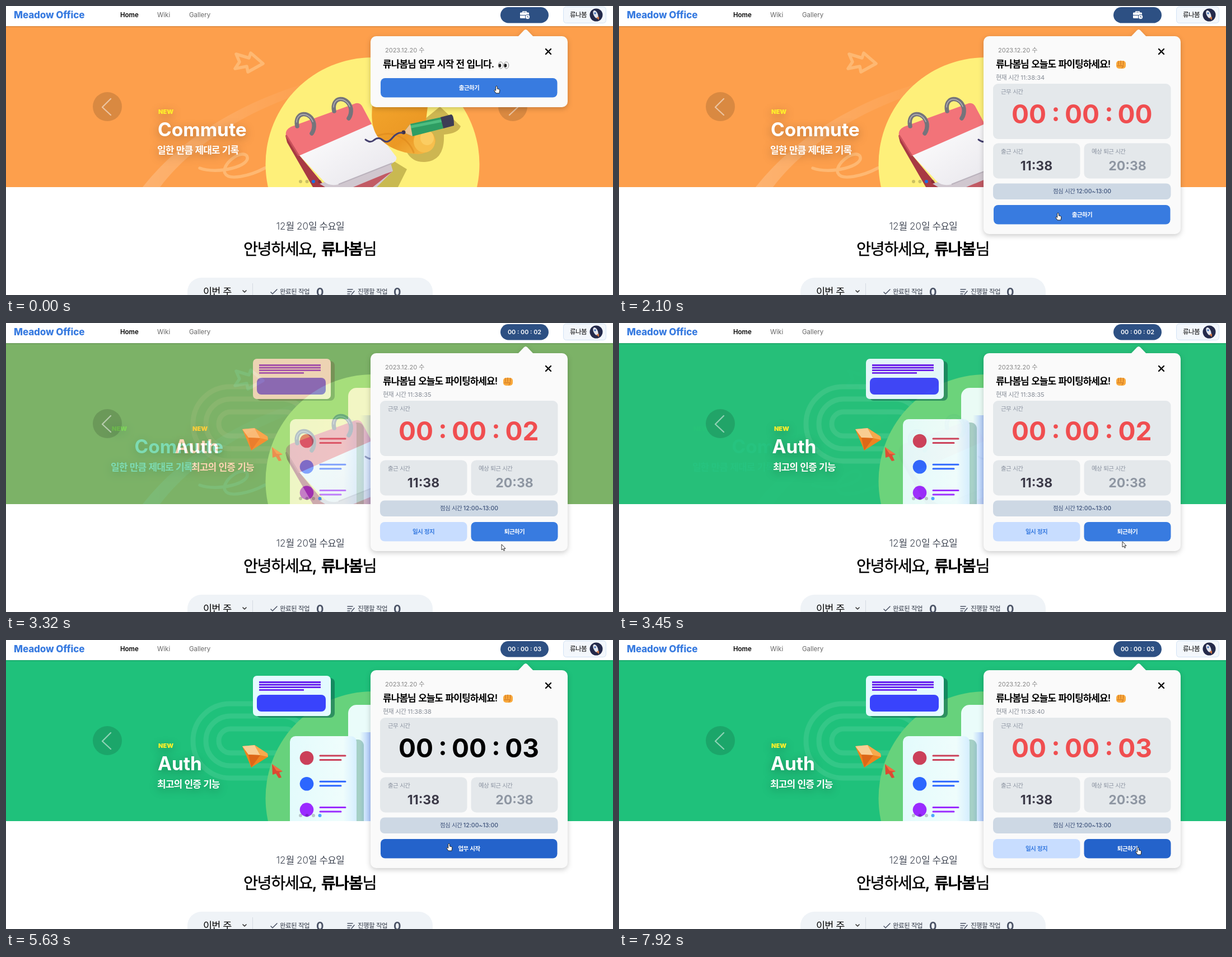
An HTML page for the animation above (8000 ms loop, 1084 by 517 pixels).

```html
<!DOCTYPE html>
<html lang="ko">
<head>
<meta charset="utf-8">
<style>
html, body { margin: 0; width: 100%; height: 100%; overflow: hidden; background: #fff; }
svg { display: block; width: 1084px; height: 517px; }
text { font-family: Inter, "Noto Sans CJK KR", "Noto Sans CJK", sans-serif; white-space: pre; }
.ko { letter-spacing: -.055em; }
.mid { text-anchor: middle; }
.bold { font-weight: 700; }
.semi { font-weight: 600; }
.label { font-size: 10.5px; fill: #8b93a0; }
.button { font-size: 10.5px; font-weight: 600; fill: #fff; text-anchor: middle; }
.caption text { fill: #fff; font-weight: 600; font-size: 17px; filter: drop-shadow(0 4px 8px rgba(0,0,0,.3)); }
.caption .new { fill: #fff02a; font-weight: 900; font-size: 11px; }
.caption .title { font-size: 33.4px; font-weight: 700; }
.clock { font-size: 46px; font-weight: 700; text-anchor: middle; }
.dialog text { font-family: "Open Sans", "Noto Sans CJK KR", "Noto Sans CJK", sans-serif; fill: #25272b; font-size: 10px; }
.dialog .ko { letter-spacing: -.02em; }
.shadow { filter: drop-shadow(0 3px 5px rgba(0,0,0,.2)); }
.line { fill: none; stroke-linecap: round; stroke-linejoin: round; }
</style>
</head>
<body>
<svg viewBox="0 0 1084 517">
  <defs>
    <clipPath id="banner"><rect y="36" width="1084" height="288"/></clipPath>
    <linearGradient id="fade"><stop stop-color="#fff" stop-opacity=".2"/><stop offset="1" stop-color="#fff" stop-opacity="0"/></linearGradient>
    <linearGradient id="glass"><stop stop-color="#e3fbfc"/><stop offset=".8" stop-color="#effdfc"/><stop offset="1" stop-color="#d5eeff"/></linearGradient>
    <linearGradient id="glow"><stop stop-color="#86a8ff" stop-opacity="0"/><stop offset="1" stop-color="#86a8ff"/></linearGradient>
    <linearGradient id="page" x2="1" y2="1"><stop stop-color="#fff"/><stop offset="1" stop-color="#e6e4ea"/></linearGradient>
    <linearGradient id="fur" x2="1" y2="1"><stop stop-color="#f3a52c"/><stop offset=".6" stop-color="#eb9824"/><stop offset="1" stop-color="#f8bd4a"/></linearGradient>
  </defs>

  <g clip-path="url(#banner)">
    <g>
      <rect y="36" width="1084" height="288" fill="#fd9f4c"/>
      <path d="M244 324C310 240 420 165 580 126L580 140C440 178 335 245 275 324Z" fill="url(#fade)"/>
      <g class="line" stroke="#ffd9a8" stroke-opacity=".42" stroke-width="5.5">
        <path d="M411 86L434 93L437 84L459 103L432 118L430 108L409 112L417 100Z"/>
        <path d="M346 290C378 302 440 286 430 268C419 256 384 284 391 299C397 313 436 304 462 290C492 284 510 262 492 264C470 268 460 308 486 309C500 309 508 302 520 299"/>
      </g>
      <circle cx="654.5" cy="283" r="191" fill="#fef07a"/>
      <path d="M600 324L690 276L716 292L700 324Z" fill="#c9b951"/>
      <path d="M499 232L523 266L571 324H548L502 244Z" fill="#a83a43"/>
      <path d="M560 318L686 278L691 295L662 324H570Z" fill="#d0c7cf"/>
      <path d="M620 324L678 300L690 296L655 324Z" fill="#c25a64"/>
      <path d="M523 266L652 211L697 270Q699 277 690 281L594 319Q578 323 568 314Z" fill="url(#page)"/>
      <path d="M594 319L690 281" stroke="#bbb3bd" stroke-width="2"/>
      <path d="M500 231Q498 222 509 216L622 175Q632 171 637 181L653 211L523 268Z" fill="#f27379"/>
      <path d="M500 231L523 268" stroke="#c9515b" stroke-width="3"/>
      <g class="line" stroke="#75747b" stroke-width="7.5">
        <path id="ring" d="M520 215C514 188 545 186 550 211Q551 221 546 228"/>
        <use href="#ring" x="66" y="-27"/>
      </g>
      <g class="line" stroke="#b5b4ba" stroke-width="1.5">
        <path id="shine" d="M519 208C519 190 541 189 548 207"/>
        <use href="#shine" x="66" y="-27"/>
      </g>
      <path d="M690 250L775 180L812 215Q808 228 782 230Q784 277 748 279Q726 280 716 262Z" fill="#cdb651"/>
      <path d="M655 172Q649 214 664 234Q690 263 736 265Q766 262 767 240Q764 222 748 221L754 172Z" fill="url(#fur)"/>
      <ellipse cx="747" cy="242" rx="19" ry="20" fill="#f7bf4d"/>
      <ellipse cx="752" cy="236" rx="12" ry="13" fill="#fbcd62"/>
      <path class="line" d="M664 232Q690 222 713 240Q724 250 728 262" stroke="#d98419" stroke-opacity=".5" stroke-width="3"/>
      <path d="M710 226L722 211L777 199L781 219L726 233Z" fill="#2e9d63"/>
      <path d="M719 217L779 205" stroke="#4dbd80" stroke-width="5"/>
      <path d="M710 226L722 211L726 233Z" fill="#edc18c"/>
      <path d="M776 199L795 194Q800 195 800 214L781 219Z" fill="#3d3c55"/>
      <circle cx="710" cy="226" r="3.5" fill="#3d3046"/>
      <path class="line" d="M642 239Q651 246 657 240Q665 233 673 240T690 236T708 227" stroke="#45406e" stroke-width="3"/>
      <g class="caption" id="oldText">
        <text class="new" x="272" y="192.5">NEW</text>
        <text class="title" x="271" y="232.5">Commute</text>
        <text x="270" y="264">일한 만큼 제대로 기록</text>
      </g>
    </g>
    <g id="newSlide">
      <rect y="36" width="1084" height="288" fill="#1fc17b"/>
      <g class="line" stroke="#fff" stroke-opacity=".09" stroke-width="9">
        <rect x="334" y="114" width="250" height="133" rx="66"/>
        <rect x="357" y="136" width="180" height="89" rx="44"/>
        <rect x="380" y="159" width="140" height="43" rx="21"/>
      </g>
      <circle cx="654.5" cy="283" r="191" fill="#67d27c"/>
      <rect x="447" y="68" width="140" height="71" rx="8" fill="#0e6d52" opacity=".65"/>
      <rect x="441" y="64" width="139" height="72" rx="7" fill="#e3faff"/>
      <path d="M452 75.5H562M452 80H562M452 84.7H562M452 89.3H532" stroke="#6418ee" stroke-width="2.8"/>
      <rect x="448" y="98" width="123" height="30" rx="8" fill="#3943fc"/>
      <rect x="611" y="116" width="180" height="240" rx="15" fill="#eafcfa"/>
      <rect x="632" y="165" width="22" height="159" fill="url(#glow)" opacity=".7"/>
      <rect x="516" y="178" width="123" height="170" rx="11" fill="#3c8d79" opacity=".4"/>
      <rect x="507" y="172" width="119" height="180" rx="10" fill="url(#glass)"/>
      <g id="rows"></g>
      <path d="M422 190L444 188L467 203L468 209L438 228Z" fill="#ee8420"/>
      <path d="M422 190L444 188L454 206L433 205Z" fill="#f9cf95"/>
      <path d="M444 188L467 203L468 209L454 206Z" fill="#f7aa4d"/>
      <path d="M433 205L454 206L438 228Z" fill="#dd6717"/>
      <path d="M475 222L494 235L488 237L492 246L487 247L482 239L476 241Z" fill="#dc4932"/>
      <path d="M475 222L494 235L483 234Z" fill="#f16f3f"/>
      <g class="caption" id="newText">
        <text class="new" x="272" y="192.5">NEW</text>
        <text class="title" x="271" y="232.5">Auth</text>
        <text x="270" y="264">최고의 인증 기능</text>
      </g>
    </g>
    <g fill="#000" fill-opacity=".14"><circle cx="181" cy="180" r="26"/><circle cx="905" cy="180" r="26"/></g>
    <path class="line" d="M187 166L172 181L187 195M899 166L914 181L899 195" stroke="#fff" stroke-opacity=".5" stroke-width="2.3"/>
    <g id="dots"></g>
  </g>

  <rect y="36" width="1084" height="2" fill="#000" opacity=".1"/>
  <rect width="1084" height="36" fill="#fff"/>
  <text x="14" y="22" font-size="17" font-weight="800" letter-spacing="-.1" fill="#387be0">Meadow Office</text>
  <text x="204" y="20" font-size="11.5" class="semi">Home</text>
  <g font-size="11.5" fill="#666"><text x="270" y="20">Wiki</text><text x="327" y="20">Gallery</text></g>
  <rect x="883" y="2" width="86" height="28.5" rx="14.2" fill="#2d5083"/>
  <g id="case">
    <path d="M923 12V10H929V12" fill="none" stroke="#fff" stroke-width="1.6"/>
    <rect x="918" y="11.5" width="16" height="10.5" rx="1.5" fill="#fff"/>
    <path d="M918 16.5H928" stroke="#2d5083"/>
    <circle cx="931.5" cy="19.5" r="4.2" fill="#fff" stroke="#2d5083"/>
    <path d="M931.5 17.5V20H933.5" fill="none" stroke="#2d5083" stroke-width=".9"/>
  </g>
  <text id="pill" class="mid semi" x="926" y="20" font-size="10.8" fill="#fff"></text>
  <rect x="995.5" y="1.5" width="76" height="29" rx="5" fill="#f3f7fc" stroke="#d3e3f5"/>
  <text x="1007" y="20" font-size="11.5">류나봄</text>
  <circle cx="1054" cy="16" r="11.5" fill="#242a4b"/>
  <ellipse cx="1053" cy="15" rx="3.8" ry="7.5" transform="rotate(-25 1053 15)" fill="#e3e6ef"/>
  <circle cx="1052" cy="13" r="1.8" fill="#4876bb"/>
  <path d="M1054 21L1059 19L1059 25Z" fill="#d57947"/>

  <text class="mid" x="543" y="400" font-size="17" font-weight="300" fill="#444a57">12월 20일 수요일</text>
  <text class="mid" x="542.5" y="445" font-size="28.4" font-weight="500" stroke="#000" stroke-width=".4">안녕하세요, <tspan font-weight="700" stroke="none">류나봄</tspan>님</text>
  <rect x="324" y="486" width="438" height="90" rx="25" fill="#eff3f7"/>
  <text x="352" y="517" font-size="17.5">이번 주</text>
  <path class="line" d="M423 509L426 512L429 509" stroke="#333" stroke-width="1.6"/>
  <path d="M440.5 496V517" stroke="#d5dbe2"/>
  <path class="line" d="M473 512L476 515L484 507M610 507H619M610 511H617M610 515H614M617 516L622 510" stroke="#4b5366" stroke-width="1.5"/>
  <g font-size="11.5" fill="#333a48"><text x="489" y="515">완료된 작업</text><text x="628" y="515">진행할 작업</text></g>
  <g font-size="20" class="bold" fill="#4b5366"><text x="554" y="518.5">0</text><text x="692" y="518.5">0</text></g>

  <g class="shadow">
    <path d="M914 55L925 43.5Q928 40.5 931 43.5L942 55Z" fill="#fafafa"/>
    <rect id="panel" x="651" y="54" width="352" height="127" rx="10" fill="#fafafa"/>
  </g>
  <text x="677" y="83" font-size="11" fill="#858585">2023.12.20 수</text>
  <path d="M964 77L973 86M973 77L964 86" stroke="#000" stroke-width="2.4" stroke-linecap="round"/>
  <text id="greeting" class="semi" x="673" y="109.5" font-size="17"></text>
  <g id="eyes">
    <g fill="#fff" stroke="#8b8b8b"><ellipse cx="883.5" cy="106" rx="4.3" ry="6"/><ellipse cx="893.5" cy="106" rx="4.3" ry="6"/></g>
    <g fill="#222"><ellipse cx="882" cy="106.5" rx="2.3" ry="3.2"/><ellipse cx="892" cy="106.5" rx="2.3" ry="3.2"/></g>
  </g>
  <g id="details">
    <rect x="888" y="98" width="17" height="14" rx="5" fill="#f9a93c"/>
    <path class="line" d="M892 99V105M896 98V105M900.5 99V105M890 107H901L898 111" stroke="#c36b1c"/>
    <text id="now" x="673" y="131.5" font-size="11" fill="#858b95"></text>
    <g fill="#e4e8eb">
      <rect x="668" y="139" width="317.5" height="99" rx="9"/>
      <rect x="668" y="245.5" width="155.5" height="63" rx="9"/>
      <rect x="830.5" y="245.5" width="155" height="63" rx="9"/>
    </g>
    <rect x="668" y="317.5" width="317.5" height="28.5" rx="8" fill="#cdd8e4"/>
    <text class="label" x="682" y="157">근무 시간</text>
    <text class="label" x="682" y="264">출근 시간</text>
    <text class="label" x="844" y="264">예상 퇴근 시간</text>
    <g id="clock" class="clock">
      <text x="732" y="210">00</text><text x="780" y="206">:</text>
      <text x="827" y="210">00</text><text x="875" y="206">:</text>
      <text id="seconds" x="921.5" y="210"></text>
    </g>
    <g font-size="23" class="mid bold"><text x="745.5" y="294" fill="#3c3a48">11:38</text><text x="908" y="294" fill="#8e96a2">20:38</text></g>
    <text class="mid" x="827" y="335" font-size="10.5" font-weight="500" fill="#3b5079">점심 시간 12:00~13:00</text>
  </g>
  <g id="single"><rect id="singleBox" x="669" y="356" width="315.5" height="34.5" rx="8"/><text id="singleText" class="button" x="827" y="376.5"></text></g>
  <g id="pair">
    <rect x="668" y="356" width="155.5" height="34.5" rx="8" fill="#c8ddff"/>
    <rect id="leave" x="830.5" y="356" width="155" height="34.5" rx="8"/>
    <text class="button" x="745.5" y="376.5" style="fill:#387be0">일시 정지</text>
    <text class="button" x="908" y="376.5">퇴근하기</text>
  </g>

  <g id="dialog" class="dialog">
    <rect class="shadow" x="388" y="-12" width="322.5" height="110.5" rx="8" fill="#fff"/>
    <text x="403" y="21" style="font-size:11.3px">glittering-speculoos-415dd0.netlify.app 내용:</text>
    <text id="question" x="403" y="41.5"></text>
    <rect x="596" y="54.5" width="50" height="31" rx="15.5" fill="#fff" stroke="#1250b6" stroke-width="2"/>
    <rect x="598.5" y="57" width="45" height="26" rx="13" fill="#1250b6"/>
    <rect x="650.5" y="57" width="45" height="26" rx="13" fill="#fff" stroke="#b4cdf3"/>
    <text class="mid" x="621" y="73.5" style="fill:#fff">확인</text>
    <text class="mid" x="673" y="73.5" style="fill:#1250b6">취소</text>
  </g>

  <g id="cursor" stroke="#222" stroke-linejoin="round" fill="#fff">
    <path id="arrow" d="M0 0V10L2.3 8L4 11.5L5.5 10.8L4 7.5H7Z" stroke-width=".9"/>
    <path id="hand" d="M-1.3 1Q0 -1 1.3 1V5L5 6Q6 6.5 5.8 8L5 13H-1L-4.5 8Q-4 6.5 -1.3 8.3Z"/>
  </g>
</svg>
<script>
const LOOP = 8000, BLUE = '#387be0', DARK = '#2463cb';
const $ = id => document.getElementById(id);
const wrap = s => s.replace(/[가-힣]+/g, '<tspan class="ko">$&</tspan>');
const shown = {};

function write(id, s) {
  if (shown[id] !== s) $(id).innerHTML = wrap(shown[id] = s);
}
const show = (id, on) => { $(id).style.display = on ? '' : 'none'; };
const paint = (id, color) => $(id).setAttribute('fill', color);
const clamp = v => Math.min(1, Math.max(0, v));
const mix = (a, b, k) => a + (b - a) * k;

// The standard CSS "ease" curve.
function ease(x) {
  let lo = 0, hi = 1;
  const bezier = (s, a, b) => 3 * s * (1 - s) ** 2 * a + 3 * s * s * (1 - s) * b + s ** 3;
  for (let i = 0; i < 20; i++) {
    const m = (lo + hi) / 2;
    if (bezier(m, .25, .25) < x) lo = m; else hi = m;
  }
  return bezier(lo, .1, 1);
}

// Last value whose start time has passed.
const pick = (t, steps) => steps.filter(s => s[0] <= t).pop()[1];

// Pointer path: time, x, y
const path = [
  [0, 876, 143], [100, 876, 143], [400, 622, 77], [760, 622, 77], [1450, 784, 352],
  [1800, 784, 370], [2420, 784, 370], [2700, 790, 374], [2930, 790, 374],
  [3320, 885, 396], [3450, 899, 391], [3720, 899, 391], [3910, 966, 368],
  [4450, 966, 368], [4760, 791, 364], [5690, 791, 364], [6400, 622, 77],
  [6920, 622, 77], [7240, 800, 280], [7480, 992, 350], [7750, 927, 371], [LOOP, 927, 371]
];

function pointer(t) {
  const i = Math.max(1, path.findIndex(p => p[0] > t));
  const [a, b] = [path[i - 1], path[i]];
  const k = clamp((t - a[0]) / (b[0] - a[0])), s = k * k * (3 - 2 * k);
  return [mix(a[1], b[1], s), mix(a[2], b[2], s)];
}

// The title travels half as far as the lines around it.
function moveCaption(id, dx) {
  [...$(id).children].forEach((el, i) =>
    el.setAttribute('transform', `translate(${i === 1 ? dx / 2 : dx})`));
}

function draw(t) {
  const large = t >= 760;
  const running = (t >= 2160 && t < 4850) || t >= 6930;
  const paused = t >= 4850 && t < 6930;
  const [x, y] = pointer(t);

  const p = ease(clamp((t - 3221) / 300));
  $('newSlide').style.opacity = p;
  moveCaption('oldText', -144 * p);
  moveCaption('newText', 144 * (1 - p));
  [...$('dots').children].forEach((dot, i) => {
    const active = i === (t < 3221 ? 2 : 3);
    dot.setAttribute('fill', active ? '#007aff' : '#000');
    dot.setAttribute('opacity', active ? (i === 3 ? .65 : .85) : .2);
  });

  const sec = pick(t, [[0, '00'], [2160, '01'], [3180, '02'], [4180, '03']]);
  const now = pick(t, [[0, 34], [2500, 35], [4450, 37], [4960, 38], [6930, 39], [7600, 40]]);
  show('case', t < 2160);
  write('pill', t < 2160 ? '' : `00 : 00 : ${sec}`);
  write('seconds', sec);
  write('now', `현재 시간 11:38:${now}`);
  paint('clock', paused ? '#000' : '#f04e50');

  $('panel').setAttribute('height', large ? 354 : 127);
  write('greeting', large ? '류나봄님 오늘도 파이팅하세요!' : '류나봄님 업무 시작 전 입니다.');
  show('eyes', !large);
  show('details', large);
  show('single', !running);
  show('pair', running);
  $('single').setAttribute('transform', `translate(0 ${large ? 0 : -227})`);
  write('singleText', paused ? '업무 시작' : '출근하기');
  paint('singleBox', paused ? DARK : BLUE);
  paint('leave', t > 7600 ? DARK : BLUE);

  const open = t < 3000 ? [100, 700] : [5700, 6860];
  $('dialog').style.opacity = clamp((t - open[0]) / 90) * clamp((open[1] + 60 - t) / 60);
  write('question', '현재 시각은 11:38 입니다. ' + (t < 3000 ? '출근하시겠습니까?' : '업무를 재개하시겠습니까?'));

  const top = large ? 356 : 129;
  const dialogOpen = t >= open[0] && t < open[1];
  const hand = !dialogOpen && x > 669 && x < 985 && y >= top && y < top + 34;
  $('cursor').setAttribute('transform', `translate(${x} ${y})`);
  show('hand', hand);
  show('arrow', !hand);
}

$('dots').innerHTML = [526, 537.5, 549, 560.5].map(x => `<circle cx="${x}" cy="314" r="3"/>`).join('');
$('rows').innerHTML = ['#cb4059', '#2c66ff', '#9a2bff'].map((c, i) => {
  const y = 211 + 46.3 * i;
  return `<circle cx="537" cy="${y}" r="12.3" fill="${c}"/>
    <path d="M561 ${y - 4}H606M561 ${y + 3.5}H598" stroke="${c}" stroke-width="3" stroke-linecap="round"/>`;
}).join('');
document.querySelectorAll('text').forEach(el => { el.innerHTML = wrap(el.innerHTML); });

const start = performance.now();
function frame() {
  draw((performance.now() - start) % LOOP);
  requestAnimationFrame(frame);
}
frame();
</script>
</body>
</html>
```
